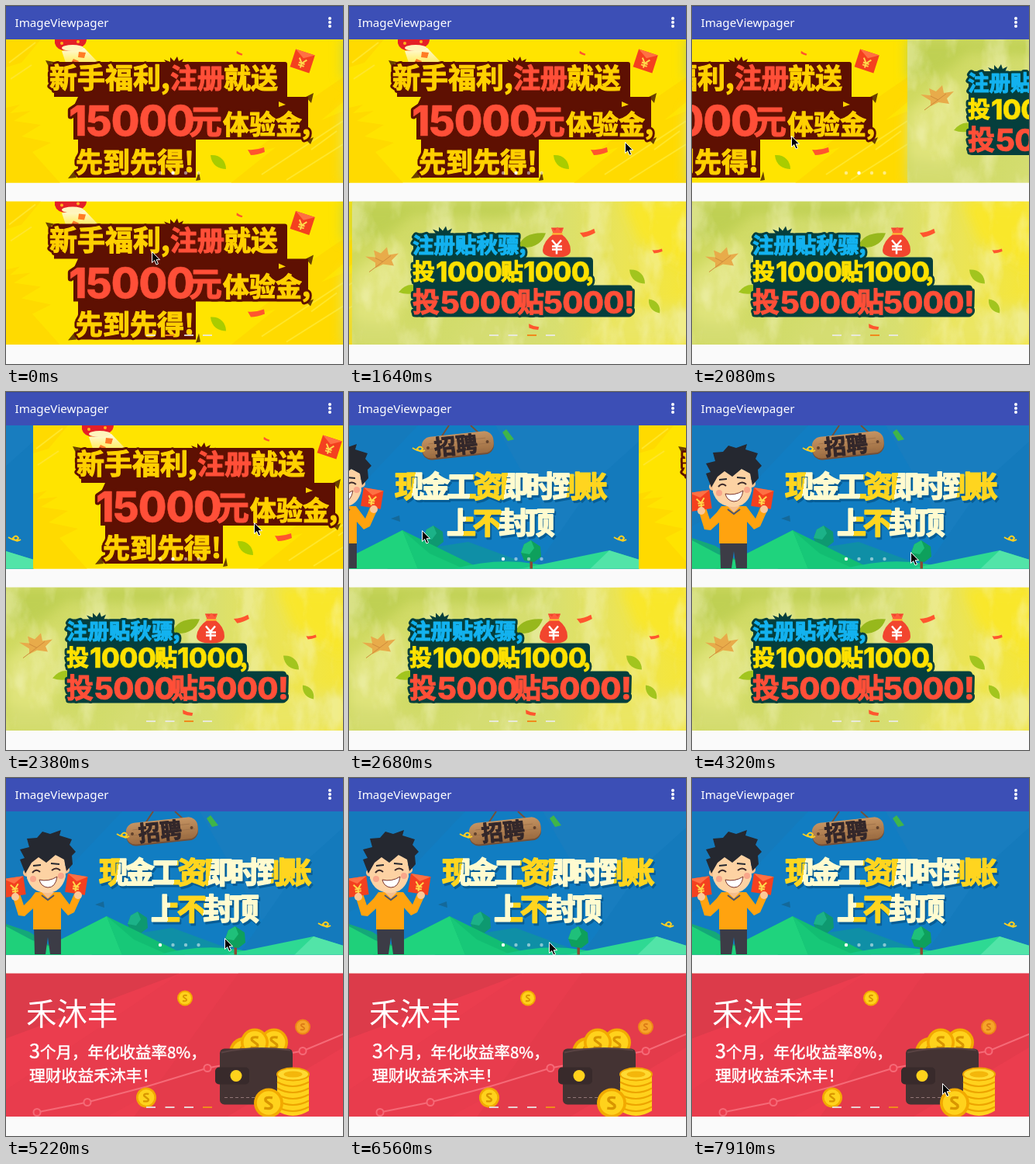
Write an HTML page that moves like this. It is 435 by 461 pixels and loops after 8000 ms.

```html
<!DOCTYPE html>
<html lang="zh">
<head>
<meta charset="utf-8">
<title>ImageViewpager</title>
<style>
html, body { margin: 0; width: 100%; height: 100%; overflow: hidden; background: #fafafa; }
#stage { display: block; width: 100%; height: 100%; }
text { font-family: "Noto Sans CJK SC", "Noto Sans CJK", sans-serif; }
.title { font: 400 15.2px "Noto Sans", sans-serif; fill: #fff; }
.heavy { font-weight: 900; stroke-linejoin: round; }
.slogan text { fill: currentColor; stroke: var(--edge, currentColor); stroke-width: var(--weight, 1.2); }
.slogan .num { font-family: Inter, sans-serif; font-weight: 800; letter-spacing: -.02em; stroke-width: var(--weight, .5); }
.brown { --edge: #5e1002; --weight: 7; }
.teal { --edge: #053f3d; --weight: 7; }
.gold { color: #ffd000; }
.lemon { color: #ffe100; }
.sky { color: #13b2ef; }
.red { color: #ff4f38; }
</style>
</head>
<body>
<svg id="stage" viewBox="0 0 435 461" preserveAspectRatio="none">
<defs>
  <linearGradient id="meadow">
    <stop offset="0" stop-color="#cfd95f"/><stop offset=".3" stop-color="#d2dc6c"/>
    <stop offset=".6" stop-color="#d8df70"/><stop offset=".8" stop-color="#ebe456"/><stop offset="1" stop-color="#f6e637"/>
  </linearGradient>
  <linearGradient id="cash" gradientUnits="userSpaceOnUse" x1="121" y1="50" x2="391" y2="95">
    <stop offset=".1" stop-color="#ffd51f"/><stop offset=".1" stop-color="#fffbd0"/>
    <stop offset=".37" stop-color="#fffbd0"/><stop offset=".37" stop-color="#ffd51f"/>
    <stop offset=".53" stop-color="#ffd51f"/><stop offset=".53" stop-color="#fffbd0"/>
    <stop offset=".82" stop-color="#fffbd0"/><stop offset=".82" stop-color="#ffd51f"/>
  </linearGradient>
  <linearGradient id="wood" x2="0" y2="1"><stop stop-color="#c59463"/><stop offset="1" stop-color="#9b6b40"/></linearGradient>
  <linearGradient id="beam" x2="0" y2="1"><stop stop-color="#fffbe0"/><stop offset="1" stop-color="#fff3a0" stop-opacity=".35"/></linearGradient>
  <filter id="soft" x="-20%" y="-20%" width="140%" height="140%"><feGaussianBlur stdDeviation="8"/></filter>
  <filter id="wash" x="0" y="0" width="100%" height="100%">
    <feTurbulence type="fractalNoise" baseFrequency=".03 .015" numOctaves="4" seed="4"/>
    <feColorMatrix values="0 0 0 0 .94  0 0 0 0 .93  0 0 0 0 .6  3.5 0 0 0 -1.55"/>
  </filter>

  <path id="leaf" d="M-10 -9C2 -10 10 -2 10 9C1 9 -9 4 -10 -9Z"/>
  <path id="chip" d="M-11 -2Q0 -1 10 -5L11 1Q1 5 -7 5Z"/>
  <path id="spikes" d="M-14 10L-8 5L-13 -2L-5 1L-5 -5L0 0L4 -6L6 0L12 -3L9 4L14 10Z"/>
  <g id="coin"><circle r="10" fill="#f2a900"/><circle r="8" fill="#ffd21c"/><path d="M2.600 -3.500Q-3 -4.500 -2 -1.500L2 1.500Q3 4.500 -3 3.500" fill="none" stroke="#d99600" stroke-width="1.800"/></g>
  <g id="packet">
    <path d="M-13 -11L13 -11L13 13L-13 13Z" fill="#f4401f"/><path d="M-13 -11H13L0 -3Z" fill="#ff7043"/>
    <path d="M-5 -2L0 4L5 -2M0 4V10M-4 4H4M-4 7H4" fill="none" stroke="#ffd84a" stroke-width="2"/>
  </g>
  <g id="tree"><path d="M-1.500 4H2V23H-1.500Z" fill="#8a4a32"/><path d="M0 -16L12 -8L13 5L4 12L-9 10L-13 0L-9 -11Z" fill="#0ea05c"/><path d="M0 -16L-9 -11L-13 0L-2 2L4 -6Z" fill="#1fc07a"/></g>

  <g id="page0">
    <rect width="436" height="185" fill="#117dc2"/>
    <path d="M0 0H150L60 95L0 130Z" fill="#147abc"/><path d="M250 0H436V60L330 140Z" fill="#187dbf"/>
    <path d="M380 70L436 20V185H300Z" fill="#147abc"/>
    <path d="M0 145L30 155L75 185H0Z" fill="#14a878"/>
    <path d="M0 148L34 166L90 185H0Z" fill="#1fd07a"/>
    <path d="M150 160L215 150L310 185H110Z" fill="#0f8fa6"/>
    <g opacity=".8"><use href="#tree" x="170" y="145"/></g>
    <path d="M30 185L61 170L130 135L232 185Z" fill="#12bd72"/><path d="M30 185L61 170L130 135L150 185Z" fill="#1fd37d"/><path d="M130 135L165 165L210 185H150Z" fill="#17c878"/>
    <path d="M195 185Q250 170 300 178L340 185Z" fill="#18c987"/>
    <path d="M280 185L397 161L436 173V185Z" fill="#2ed993"/><path d="M397 161L436 173V185H372Z" fill="#52e4a8"/>
    <use href="#tree" x="296" y="164"/>
    <path d="M259 9L264 5L274 18L266 20Z" fill="#3fb54a"/><path d="M115 120L126 116L127 124Z" fill="#14699a"/>
    <path d="M180 15L190 0M218 0L231 12" stroke="#74503a" stroke-width="2"/>
    <g transform="rotate(-6 201 27)">
      <rect x="155" y="13" width="93" height="28" rx="12" fill="#735039"/><rect x="155" y="11" width="93" height="28" rx="12" fill="url(#wood)"/>
      <path d="M164 20H238M160 27H244M165 34H236" stroke="#9d7049" stroke-width=".8"/>
      <circle cx="163" cy="25" r="2" fill="#61412c"/><circle cx="240" cy="25" r="2" fill="#61412c"/>
      <text x="171" y="36" class="heavy" font-size="28" fill="#33272a" stroke="#33272a">招聘</text>
    </g>
    <path id="curl" d="M143 29Q154 36 156 30Q153 25 149 30Q153 36 159 32" fill="none" stroke="#ffcf21" stroke-width="2"/>
    <use href="#curl" x="260" y="115"/>
    <g class="heavy" font-size="38" letter-spacing="-4.200" stroke-width="1.800">
      <g fill="#075d96" stroke="#075d96"><text x="122" y="95">现金工资即时到账</text><text x="189" y="142">上不封顶</text></g>
      <g fill="url(#cash)" stroke="url(#cash)"><text x="120" y="92">现金工资即时到账</text><text x="187" y="139">上不封顶</text></g>
    </g>
    <g>
      <path d="M36 148H71V184H57L54 162L51 184H37Z" fill="#3c3c46"/>
      <path d="M38 104L32 112L23 121L18 106L8 108L16 134L24 135L35 125V152H71V124L80 134L88 130L97 110L88 106L82 120L70 104Z" fill="#ffa30f"/>
      <path d="M46 104H62L54 112Z" fill="#f5bd8c"/><path d="M46 108L54 114L62 108" fill="none" stroke="#4b5570" stroke-width="2"/>
      <use href="#packet" transform="translate(11 96) rotate(-8)"/><use href="#packet" transform="translate(91 93) rotate(9)"/>
      <circle cx="12" cy="110" r="5" fill="#fbc898"/><circle cx="93" cy="108" r="5" fill="#fbc898"/>
    </g>
    <g transform="translate(3 2)">
      <circle cx="24" cy="77" r="5" fill="#f8c391"/><circle cx="74" cy="73" r="5" fill="#f8c391"/>
      <path d="M24 60Q49 44 73 60L74 82Q69 102 51 103Q30 103 24 84Z" fill="#fdd2a3"/>
      <path d="M22 78L15 60L21 58L15 47L27 44L24 33L37 32L44 24L54 27L68 22L66 29L82 34L79 41L87 50L82 55L83 66L75 75L72 60L61 54L49 64L39 57L30 64Z" fill="#252830"/>
      <path d="M31 77Q36 71 41 76M56 74Q62 69 67 74" fill="none" stroke="#3b2929" stroke-width="2"/>
      <path d="M32 68L42 67M55 65L66 66" stroke="#252830" stroke-width="2"/>
      <circle cx="32" cy="85" r="4" fill="#f9a68a"/><circle cx="68" cy="81" r="4" fill="#f9a68a"/>
      <path d="M40 86Q52 89 63 82Q61 96 51 96Q42 95 40 86Z" fill="#fff" stroke="#7b362e"/>
    </g>
  </g>

  <g id="page1">
    <rect width="436" height="185" fill="#ffe400"/>
    <path d="M0 0H45L20 30L0 36ZM0 88L18 84L5 95L32 92L10 105L45 110L20 125L58 133L34 145L70 185H0ZM290 185L348 139L315 148L385 95L360 100L436 48V80L407 104L436 92V185Z" fill="#ffda00"/>
    <path d="M330 174L435 105M362 181L435 135M394 142L427 118M4 30L38 4M6 51L33 33" stroke="#ffe62a" stroke-width="2"/>
    <path d="M72 15L101 11L123 34L80 39Z" fill="url(#beam)"/>
    <path d="M63 0H104Q104 10 86 14Q66 17 63 5Z" fill="#e51f27"/><ellipse cx="86" cy="11" rx="14" ry="4" fill="#fff5bd"/><circle cx="72" cy="5" r="2" fill="#ffb41d"/><circle cx="93" cy="3" r="2" fill="#ffb41d"/>
    <path d="M94 16L103 17L101 24L93 23ZM87 25L94 28L90 34L84 30ZM97 29L103 30L101 36L95 34Z" fill="#ff7b24"/>
    <path d="M51 27L62 29L55 35ZM387 74L397 69L394 82ZM80 179L89 168L91 178ZM245 182L249 170L251 181ZM353 80L361 84L352 89ZM388 130L397 126L393 135Z" fill="#6a4100"/>
    <use href="#spikes" x="217" y="28" fill="#5e1002"/>
    <path d="M62 29H360Q363 29 363 32V74H390V129H245V178H93V129H87V87L93 74H62Z" fill="#5e1002"/>
    <path d="M352 80L361 84L352 87Z" fill="#ffd000"/>
    <g id="welcome" class="slogan heavy gold">
      <text x="56" y="63" font-size="36">新手福利,</text><text x="212" y="63" font-size="35" class="red">注册</text><text x="281" y="63" font-size="35">就送</text>
      <text x="81" y="124" font-size="53" class="num red">15000</text><text x="236" y="122" font-size="43" class="red">元</text><text x="280" y="122" font-size="34">体验金,</text>
      <text x="90" y="171" font-size="35">先到先得!</text>
    </g>
    <use href="#welcome" class="brown"/><use href="#welcome"/>
    <use href="#packet" transform="translate(383 27) rotate(18)"/>
    <use href="#chip" x="323" y="144" fill="#ff552e"/><use href="#chip" transform="translate(301 18) scale(.4) rotate(35)" fill="#ff552e"/>
    <use href="#leaf" x="274" y="158" fill="#a9cc00"/>
  </g>

  <g id="page2">
    <rect width="436" height="185" fill="url(#meadow)"/>
    <g filter="url(#soft)">
      <path d="M0 0H260L190 22L80 16L45 45L0 50Z" fill="#bfd052"/><path d="M30 70Q83 30 70 110T0 165V94Z" fill="#e0e47c"/>
      <path d="M0 151L80 165L120 185H0ZM160 150L230 155L260 185H130Z" fill="#d5dd72"/>
      <path d="M350 0H436V90L370 50Z" fill="#f9e72c"/><path d="M330 150L436 130V185H300Z" fill="#ebe663"/>
    </g>
    <rect width="436" height="185" filter="url(#wash)" opacity=".4"/>
    <path d="M214 59Q221 39 250 41Q242 63 214 59Z" fill="#97b81c"/>
    <path d="M60 117Q69 105 82 108V118Q70 121 60 117Z" fill="#a2c51e"/>
    <path d="M17 71L30 72L28 63L37 67L45 59L47 69L60 67L51 76L54 83L40 81L30 86L30 79Z" fill="#e8ab4a"/><path d="M22 91L50 70M30 73L40 78" stroke="#cf8b3a" fill="none"/>
    <use href="#spikes" x="117" y="38" fill="#053f3d"/>
    <path d="M81 41H215V72H306Q311 72 311 77V108H357Q362 108 362 113V144Q362 149 357 149H84Q79 149 79 144V43Z" fill="#053f3d"/>
    <g id="offer" class="slogan heavy">
      <text x="78" y="66" font-size="27.500" class="sky">注册贴秋骠,</text>
      <g class="lemon"><text x="78" y="101" font-size="29">投</text><text x="108" y="103" font-size="35" class="num">1000</text><text x="192" y="101" font-size="29">贴</text><text x="221" y="103" font-size="35" class="num">1000</text><text x="302" y="102" font-size="29">,</text></g>
      <g class="red"><text x="78" y="142" font-size="35">投</text><text x="114" y="144" font-size="39.500" class="num">5000</text><text x="213" y="142" font-size="35">贴</text><text x="247" y="144" font-size="39.500" class="num">5000!</text></g>
    </g>
    <use href="#offer" class="teal"/><use href="#offer"/>
    <path d="M257 34H273L270 42Q282 51 282 63Q282 72 265 72Q246 72 246 63Q247 51 260 42Z" fill="#f2452e"/><path d="M257 34L262 38L265 33L269 38L273 34L270 42H260Z" fill="#ff5d3c"/><path d="M258 42H272" stroke="#ffc234" stroke-width="2"/>
    <path d="M258 50L264 57L270 50M264 57V68M258 58H271M258 62H271" fill="none" stroke="#fff" stroke-width="2.500"/>
    <use href="#leaf" x="368" y="97" fill="#a2c51e"/><use href="#leaf" transform="translate(390 135) rotate(10) scale(.85)" fill="#a2c51e"/>
    <use href="#chip" transform="translate(304 41) rotate(-8) scale(.9)" fill="#ff552e"/><use href="#chip" transform="translate(394 64) scale(.6)" fill="#ff552e"/><use href="#chip" transform="translate(234 162) rotate(25) scale(.65)" fill="#ff552e"/>
  </g>

  <g id="page3">
    <rect width="436" height="185" fill="#eb3d4e"/>
    <path d="M0 0H225L0 84Z" fill="#dc3b4a"/><path d="M225 0H436V20L130 185H0V150Z" fill="#e83c4d"/><path d="M300 0H436V95L285 185H165Z" fill="#e43b4b"/>
    <path d="M40 179L105 166L181 146L260 122L320 111L383 100L436 78" fill="none" stroke="#f56a77" stroke-width="2"/>
    <g fill="#eb3d4e" stroke="#f56a77" stroke-width="2"><circle cx="40" cy="179" r="4.500"/><circle cx="105" cy="166" r="4.500"/><circle cx="260" cy="122" r="4.500"/><circle cx="383" cy="100" r="4.500"/></g>
    <g fill="#fff"><text x="26" y="66" font-size="39.500" font-weight="300">禾沐丰</text>
      <g font-weight="500" stroke="#fff" stroke-width=".5"><text x="30" y="109" font-size="20.500"><tspan font-size="25">3</tspan>个月，年化收益率8%，</text>
      <text x="30" y="139" font-size="20.800">理财收益禾沐丰！</text></g></g>
    <use href="#coin" x="231" y="32"/><use href="#coin" x="383" y="69" opacity=".7"/><use href="#coin" transform="translate(181 160) scale(1.3)"/>
    <use href="#coin" transform="translate(308 102) scale(2)"/><use href="#coin" transform="translate(346 89) scale(1.8)"/><use href="#coin" transform="translate(321 89) scale(1.8)"/>
    <rect x="276" y="97" width="94" height="72" rx="6" fill="#443333"/><path d="M278 102Q320 93 367 99" stroke="#594343" stroke-width="2" fill="none"/>
    <path d="M282 160H364" stroke="#927777" stroke-dasharray="4 3"/>
    <rect x="270" y="121" width="44" height="22" rx="5" fill="#382a2b"/><circle cx="297" cy="132" r="7.500" fill="#ffd21c"/>
    <path d="M350 130V177Q370 190 391 177V130Z" fill="#ffd21c"/>
    <path d="M350 140Q370 151 391 140M350 148Q370 159 391 148M350 156Q370 167 391 156M350 164Q370 175 391 164M350 172Q370 183 391 172" stroke="#eda400" stroke-width="2" fill="none"/>
    <ellipse cx="370.500" cy="130" rx="20.500" ry="8" fill="#ffda32" stroke="#eda400" stroke-width="2"/><ellipse cx="370.500" cy="130" rx="12" ry="4" fill="#f4b60b"/>
    <use href="#coin" transform="translate(339 167) scale(1.9)"/>
  </g>
  <g id="strip"><use href="#page0"/><use href="#page1" x="435"/><use href="#page2" x="870"/><use href="#page3" x="1305"/></g>
</defs>

<rect width="435" height="461" fill="#fafafa"/>
<rect width="435" height="43" fill="#3c4fb6"/><rect width="435" height="1" fill="#3548a0"/>
<text class="title" x="11.500" y="27">ImageViewpager</text>
<g fill="#fff"><circle cx="418" cy="16" r="2"/><circle cx="418" cy="21" r="2"/><circle cx="418" cy="26" r="2"/></g>
<svg y="43" width="435" height="184.500" overflow="hidden"><use id="topStrip" href="#strip"/></svg>
<svg y="251.500" width="435" height="184.500" overflow="hidden"><use id="bottomStrip" href="#strip"/></svg>
<g id="dots"><circle cx="199" cy="215" r="2.200"/><circle cx="215.500" cy="215" r="2.200"/><circle cx="232" cy="215" r="2.200"/><circle cx="248.500" cy="215" r="2.200"/></g>
<g id="dashes"><rect x="181" y="423" width="12" height="2"/><rect x="205.500" y="423" width="12" height="2"/><rect x="230" y="423" width="12" height="2"/><rect x="254" y="423" width="12" height="2"/></g>
<path id="cursor" d="M.5 .5V14.500L3.800 11.500L6 17L8.500 16L6.200 10.700H10.500Z" fill="#000" stroke="#fff" stroke-width="1"/>
</svg>

<script>
const LOOP = 8000, TICK = 149, PAGE = 435;
const $ = id => document.getElementById(id);

// Each key is [tick, ...values].
const pointer = [
  [0, 188, 316], [1, 176, 304], [2, 155, 273], [3, 143, 232], [4, 161, 196], [5, 215, 170],
  [6, 280, 165], [7, 332, 168], [8, 353, 172], [11, 356, 175], [12, 285, 172], [14, 128, 167],
  [16, 320, 168], [17, 210, 172], [18, 94, 178], [20, 130, 198], [22, 210, 222], [24, 257, 230],
  [26, 257, 230], [27, 268, 222], [28, 287, 203], [29, 282, 206], [38, 282, 206], [39, 277, 219],
  [40, 277, 219], [41, 262, 190], [42, 245, 153], [43, 240, 180], [44, 258, 211], [45, 280, 265],
  [46, 308, 335], [47, 325, 380], [48, 322, 391], [52, 322, 391], [53, 323, 393]
];
const drag = [[11, 435], [12, 435], [14, 592], [16, 400], [17, 190], [18, 61], [19, 8], [20, 0]];

function track(keys, tick) {
  const next = keys.findIndex(key => key[0] > tick);
  if (next === 0) return keys[0].slice(1);
  if (next < 0) return keys[keys.length - 1].slice(1);
  const a = keys[next - 1], b = keys[next], p = (tick - a[0]) / (b[0] - a[0]);
  return a.slice(1).map((v, i) => v + (b[i + 1] - v) * p);
}

function settle(time, start, duration) {
  const p = Math.min(1, Math.max(0, (time - start) / duration));
  return 1 - (1 - p) ** 5;
}

function mark(group, active, on, off) {
  [...group.children].forEach((el, i) => el.setAttribute("fill", i === active ? on : off));
}

function move(el, x, y = 0) {
  el.setAttribute("transform", `translate(${x} ${y})`);
}

function draw(now) {
  // The screen refreshes in ticks, slightly ahead of the nominal time.
  const tick = Math.floor((now % LOOP + 6) / TICK), time = tick * TICK;
  const [top] = track(drag, tick);
  const slide = 1 + settle(time, 1275, 600) + settle(time, 4920, 290);
  move($("topStrip"), -Math.round(top));
  move($("bottomStrip"), -Math.round(slide * PAGE));
  mark($("dots"), tick < 17 ? 1 : 0, "#fff", "rgba(255,255,255,.5)");
  mark($("dashes"), Math.ceil(slide - .01), "#f08a1c", "rgba(235,235,235,.85)");
  move($("cursor"), ...track(pointer, tick).map(Math.round));
}

const origin = performance.now();
function frame() {
  draw(performance.now() - origin);
  requestAnimationFrame(frame);
}
frame();
</script>
</body>
</html>
```
